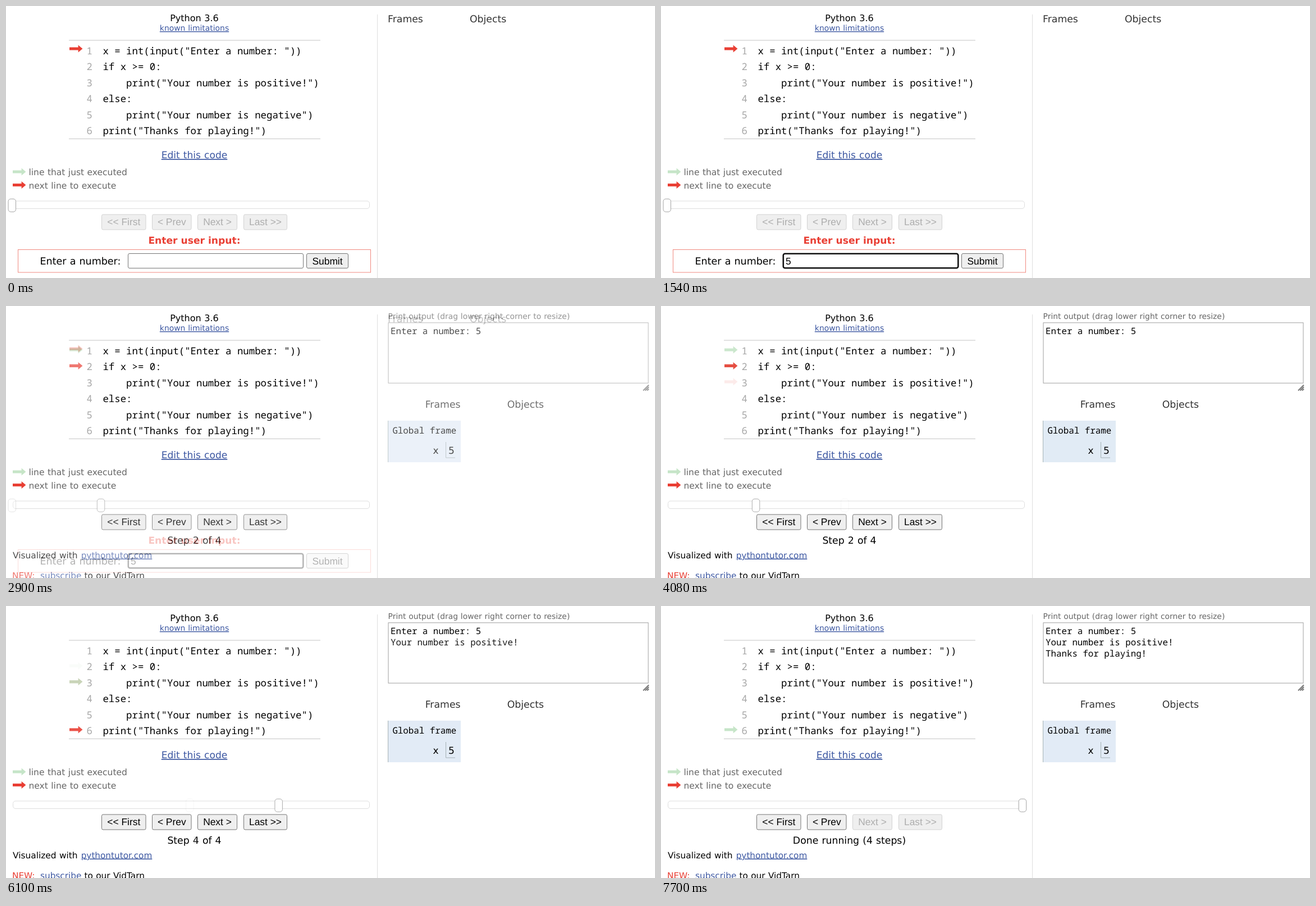
An HTML page for the animation above (9.7 s loop, 1156 by 484 pixels).

```html
<!DOCTYPE html>
<html lang="en">
<head>
<meta charset="utf-8">
<title>Stepping through a program</title>
<style>
  html, body { margin: 0; width: 100%; height: 100%; overflow: hidden; background: #fff; }
  svg { display: block; width: 1156px; height: 484px; }
  text { font-family: "DejaVu Sans", Verdana, sans-serif; word-spacing: .034em; white-space: pre; text-rendering: geometricPrecision; }
  .mono { font-family: "Noto Sans Mono", Consolas, monospace; word-spacing: 0; }
  .arial { font-family: "Liberation Sans", Arial, sans-serif; word-spacing: 0; }
  .bold { font-weight: bold; word-spacing: 0; }
  .link { fill: #3d58a2; text-decoration: underline; }
  .mid { text-anchor: middle; }
  .end { text-anchor: end; }
</style>
</head>
<body>
<svg id="stage" viewBox="0 0 1156 484"></svg>
<script>
const LOOP = 9700, FIRST_FADE = 1000, FADE_GAP = 1540, FADE = 600;
const RED = '#e93f34', GREEN = '#c6e5c8', GRAY = '#666';
const LINE_STEP = 28.4;

const escapeText = s => s.replace(/&/g, '&amp;').replace(/</g, '&lt;').replace(/>/g, '&gt;');
const text = (x, y, size, str, cls = '', fill = '') =>
  `<text x="${x}" y="${y}" font-size="${size}" class="${cls}"${fill && ` fill="${fill}"`}>${escapeText(str)}</text>`;
const box = (x, y, w, h, r, stroke, fill = '#fff', width = 1) =>
  `<rect x="${x}" y="${y}" width="${w}" height="${h}" rx="${r}" fill="${fill}" stroke="${stroke}" stroke-width="${width}"/>`;
const path = (d, stroke, width = 1) =>
  `<path d="${d}" fill="none" stroke="${stroke}" stroke-width="${width}"/>`;
const arrow = (x, y, fill) =>
  `<path transform="translate(${x} ${y}) scale(1.3)" fill="${fill}" d="M0-2H12V-5L18 0 12 5V2H0Z"/>`;
const button = (x, y, w, h, label, enabled = true) =>
  box(x, y, w, h, 2.5, enabled ? '#767676' : '#d2d2d2', '#efefef') +
  text(x + w / 2, y + 19.3, 17.4, label, 'arial mid', enabled ? '#000' : '#adadad');

const program = [
  'x = int(input("Enter a number: "))',
  'if x >= 0:',
  '    print("Your number is positive!")',
  'else:',
  '    print("Your number is negative")',
  'print("Thanks for playing!")'
];
const printed = ['Enter a number: 5', 'Your number is positive!', 'Thanks for playing!'];

const states = [
  { next: 1, pos: 0, asking: true },
  { next: 1, pos: 0, asking: true, typed: '5' },
  { done: 1, next: 2, pos: 1, lines: 1, label: 'Step 2 of 4' },
  { done: 2, next: 3, pos: 2, lines: 1, label: 'Step 3 of 4' },
  { done: 3, next: 6, pos: 3, lines: 2, label: 'Step 4 of 4' },
  { done: 6, pos: 4, lines: 3, label: 'Done running (4 steps)' }
];

function codePanel({ done, next }) {
  const lineY = n => 78 + (n - 1) * LINE_STEP;
  return text(335.5, 27, 16, 'Python 3.6', 'mid') +
    text(335.5, 44, 13.9, 'known limitations', 'mid link') +
    path('M112 61H560M112 236.3H560', '#c4c4c4') +
    program.map((line, i) => {
      const y = 86 + i * LINE_STEP;
      return text(154, y, 17.35, String(i + 1), 'mono end', '#a6a6a6') + text(172.4, y, 17.37, line, 'mono');
    }).join('') +
    (done ? arrow(113, lineY(done), GREEN) : '') +
    (next ? arrow(113, next === 1 ? 76 : lineY(next), RED) : '') +
    text(335.5, 271, 17.1, 'Edit this code', 'mid link') +
    arrow(12, 295, GREEN) + text(40.5, 300.5, 15.5, 'line that just executed', '', GRAY) +
    arrow(12, 318.5, RED) + text(40.5, 324.5, 15.5, 'next line to execute', '', GRAY);
}

function controls({ pos, asking }) {
  const back = !asking, forward = back && pos < 4;
  return box(12.5, 347, 635, 13.5, 4.5, '#dedede') +
    box(4 + pos * 158.3, 343.3, 13.5, 23, 4.5, '#a3a3a3') +
    button(170.5, 371, 78.5, 27, '<< First', back) +
    button(260.5, 371, 69.5, 27, '< Prev', back) +
    button(341.5, 371, 70, 27, 'Next >', forward) +
    button(423.5, 371, 77, 27, 'Last >>', forward);
}

function inputForm(typed) {
  const field = typed
    ? box(217.8, 440.8, 311.5, 25.5, 3, '#101010', '#fff', 2.6)
    : box(217.5, 440.5, 312, 26, 2.5, '#767676');
  return text(335.5, 422.5, 17.15, 'Enter user input:', 'bold mid', RED) +
    box(21.5, 433.5, 628, 40.5, 0, '#f08a80') +
    text(60.5, 459.5, 17.5, 'Enter a number:') +
    field + (typed ? text(222, 460, 17.4, typed, 'arial') : '') +
    button(535.5, 440.5, 74, 26, 'Submit');
}

const footer = label =>
  text(335.5, 422.5, 17.3, label, 'mid') +
  text(12, 448.5, 15.4, 'Visualized with') +
  text(133.7, 448.5, 15.25, 'pythontutor.com', 'link') +
  text(11, 485, 15.3, 'NEW:', '', RED) +
  text(61, 485, 15.3, 'subscribe', 'link') +
  text(139.5, 485, 15.3, 'to our VidTarn');

const headings = (x, y) =>
  text(x, y, 17.3, 'Frames', '', '#333') + text(x + 146, y, 17.3, 'Objects', '', '#333');

function memoryPanel(lines) {
  return text(680.6, 22.5, 13.85, 'Print output (drag lower right corner to resize)', '', GRAY) +
    box(681, 29.8, 463, 107.4, 0, '#a0a0a0') +
    printed.slice(0, lines).map((line, i) => text(685, 49.7 + i * 20, 15.8, line, 'mono')).join('') +
    path('M1135 150.5L1145 140.5M1138.5 150.5L1145 144M1142 150.5L1145 147.5', '#777', 2) +
    headings(746.7, 181) +
    '<rect x="680" y="204" width="130" height="74" fill="#e2ebf6"/>' +
    path('M680.5 204V278M783.5 242V270H800', '#a6b3b6') +
    text(688.4, 227, 15.8, 'Global frame', 'mono') +
    text(760.5, 263, 17, 'x') + text(788, 263, 17, '5');
}

const drawState = s =>
  '<rect width="1156" height="484" fill="#fff"/>' +
  path('M661.5 15V484', '#dfdfdf') +
  codePanel(s) + controls(s) +
  (s.asking ? inputForm(s.typed) + headings(680, 29) : footer(s.label) + memoryPanel(s.lines));

document.getElementById('stage').innerHTML =
  states.map((s, i) => `<g id="state${i}">${drawState(s)}</g>`).join('');

// Each state fades in over the one below, in ten equal steps.
const percent = ms => (ms / LOOP * 100).toFixed(5) + '%';
const style = document.createElement('style');
style.textContent = states.slice(1).map((_, i) => {
  const start = FIRST_FADE + i * FADE_GAP - 1;
  return `#state${i + 1} { animation: fade${i + 1} ${LOOP}ms infinite; }
    @keyframes fade${i + 1} {
      0%, ${percent(start)} { opacity: 0; animation-timing-function: steps(10, start); }
      ${percent(start + FADE)}, 100% { opacity: 1; }
    }`;
}).join('\n');
document.head.append(style);
</script>
</body>
</html>
```
